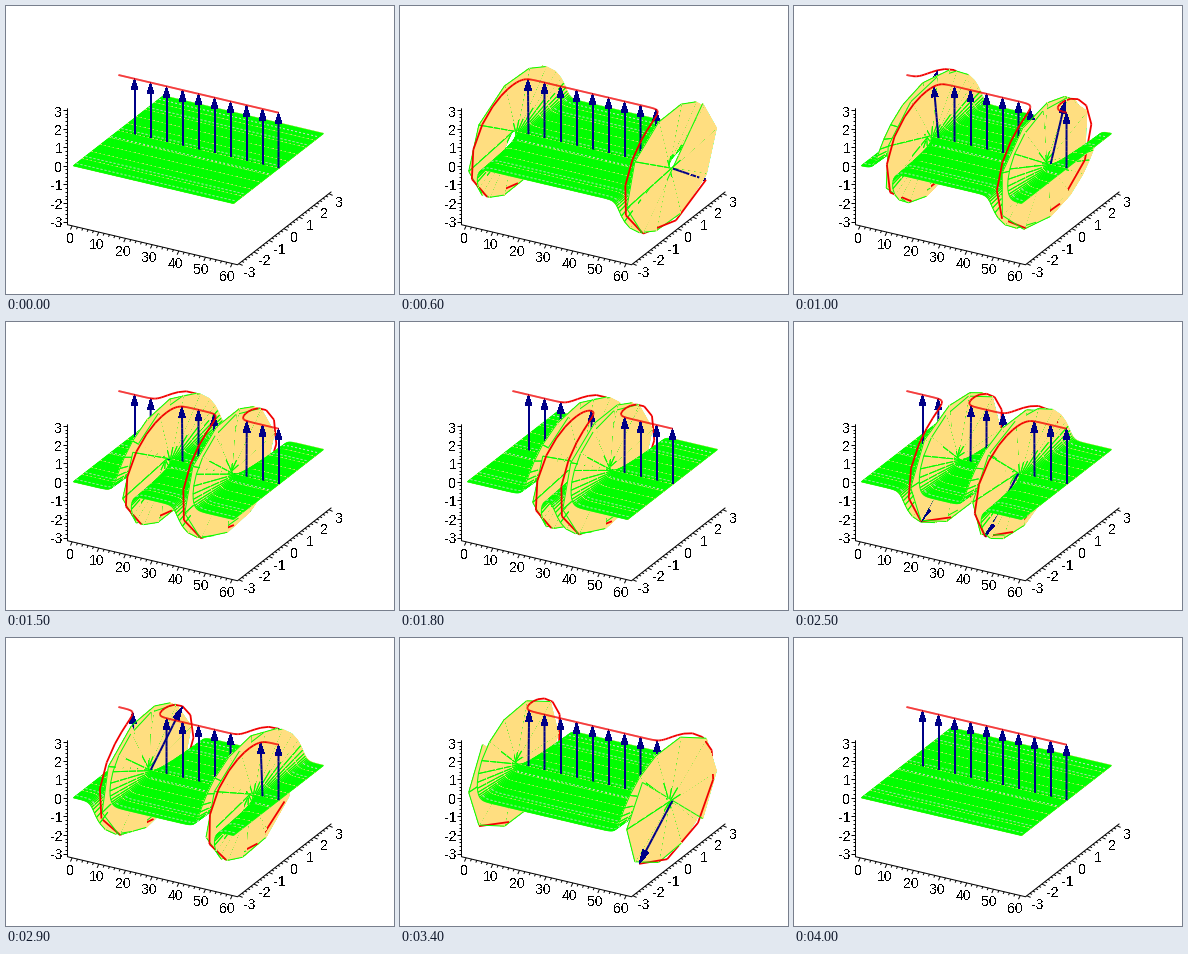
A matplotlib script that plays this animation: 388x288 px, repeating every 4100 ms.

```python
import numpy as np
import matplotlib.pyplot as plt
from matplotlib.animation import FuncAnimation
from matplotlib.collections import LineCollection, PolyCollection

W, H, DPI = 388, 288, 64
PX = 72 / DPI
FRAMES, INTERVAL = 41, 100

GREEN, WHEAT, GREY = (0, 1, 0, 1), (1, 0.87, 0.5, 1), (0.82, 0.84, 0.82, 1)
RED, NAVY, BLACK, CLEAR = (0.95, 0, 0, 1), (0, 0, 0.53, 1), (0, 0, 0, 1), (0, 0, 0, 0)

# Columns: screen x, screen y, nearness to the viewer
ORIGIN = np.array([112.5, 124.8, 0])
AXES = np.array([[2.667, 0.628, 1.33], [15, -11.67, -24.6], [0, -18.6, 8.8]])

SPEED = 0.2
GAMMA = 1 / np.sqrt(1 - SPEED**2)
CELLS, PIECES = 160, 10
XS = np.linspace(0, 60, CELLS + 1)
STRIPES = (-2.8, -2.5, -2.2, -0.5, -0.2, 0.2, 2.0, 2.4, 2.7)

plt.rcParams["text.antialiased"] = False
plt.rcParams["font.family"] = "Liberation Sans"


def project(x, y, z):
    xyz = np.stack(np.broadcast_arrays(x, y, z), axis=-1)
    return ORIGIN + xyz @ AXES


def twist(x, n):
    """Angle of a colliding sine-Gordon kink and antikink."""
    t = 10 * (n - 20)
    ratio = np.sinh(GAMMA * SPEED * t) / (SPEED * np.cosh(GAMMA * (x - 30)))
    return -4 * np.arctan(ratio)


def place(x, phi, across, up):
    y = across * np.cos(phi) + up * np.sin(phi)
    z = up * np.cos(phi) - across * np.sin(phi)
    return project(x, y, z)


class Scene:
    """Collects flat pieces and sorts them from far to near."""

    def __init__(self):
        self.polys, self.near, self.fill, self.edge, self.width = [], [], [], [], []

    def add(self, polys, fill, edge, width, lift):
        polys = polys.reshape(-1, 4, 3)
        n = len(polys)
        self.polys.append(polys[..., :2])
        self.near.append(polys[..., 2].mean(axis=1) + lift)
        self.fill.append(np.broadcast_to(fill, (n, 4)))
        self.edge.append(np.broadcast_to(edge, (n, 4)))
        self.width.append(np.full(n, width * PX))

    def lines(self, a, b, color, width, lift):
        self.add(np.stack([a, b, b, a], axis=-2), CLEAR, color, width, lift)

    def show(self, coll):
        parts = (self.polys, self.near, self.fill, self.edge, self.width)
        polys, near, fill, edge, width = map(np.concatenate, parts)
        order = np.argsort(near, kind="stable")
        coll.set_verts(polys[order])
        coll.set_facecolor(fill[order])
        coll.set_edgecolor(edge[order])
        coll.set_linewidth(width[order])
        # Smooth lines, but hard fills so that no seams show
        coll.set_antialiased(fill[order, 3] == 0)


def add_ribbon(scene, n):
    phi = twist(XS, n)
    low, high = place(XS, phi, -3, 0), place(XS, phi, 3, 0)

    # Rails alternate between cross lines and cell diagonals
    a = np.repeat(low, 2, axis=0)[:-1, None]
    b = np.repeat(high, 2, axis=0)[1:, None]
    b = np.concatenate([high[:1, None], b[:-1]])
    f = np.linspace(0, 1, PIECES + 1)[:, None]
    rails = a * (1 - f) + b * f
    quads = np.stack([rails[:-1, :-1], rails[1:, :-1], rails[1:, 1:], rails[:-1, 1:]],
                     axis=-2)
    scene.add(quads, WHEAT, CLEAR, 0, 0)
    scene.lines(rails[:, :-1], rails[:, 1:], GREEN, 1, 3)
    for side in (low, high):
        scene.lines(side[:-1], side[1:], GREEN, 1, 3)

    level = np.abs(np.sin(phi / 2)) < 0.05
    level = level[:-1] & level[1:]
    dashes = level & (np.arange(CELLS) % 4 < 2)
    for across in STRIPES:
        row = place(XS, phi, across, 0)
        scene.lines(row[:-1][dashes], row[1:][dashes], GREY, 1, 4)
    axis = place(XS, phi, 0, 0)
    scene.lines(axis[:-1][level], axis[1:][level], BLACK, 0.8, 5)


def add_arrow(scene, x, n):
    pts = place(x, twist(x, n), 0, np.linspace(0, 3, 11))
    scene.lines(pts[:8], pts[1:9], NAVY, 2, 7)
    tip, neck = pts[-1], pts[8]
    along = (tip - neck)[:2]
    size = max(np.hypot(*along), 1e-6)
    side = np.append([-along[1], along[0]], 0) / size * 3.5
    head = np.stack([neck - side, neck + side, tip, tip])
    scene.add(head, NAVY, CLEAR, 0, 8)


def draw(n):
    scene = Scene()
    add_ribbon(scene, n)
    for x in range(6, 61, 6):
        add_arrow(scene, x, n)
    tips = place(XS, twist(XS, n), 0, 3)
    scene.lines(tips[:-1], tips[1:], RED, 1.8, 9)
    scene.show(pieces)
    return (pieces,)


def draw_axes():
    x0, x1, y0, y1, z0, z1 = -1.75, 62, -3.09, 3.17, -3.17, 3.09
    corners = project([x0, x0, x1, x1], [y0, y0, y0, y1], [z1, z0, z0, z0])[:, :2]
    marks = []

    def ticks(points, major, step):
        for i, p in enumerate(points[:, :2]):
            size = 1.7 if i % major == 0 else 1
            marks.append([p, p + np.array(step) * size])

    small = np.linspace(-3, 3, 31)
    ticks(project(x0, y0, small), 5, (-2.5, 0))
    ticks(project(np.arange(0, 61, 2), y0, z0), 5, (-1, 2.2))
    ticks(project(x1, small, z0), 5, (2.2, 1))
    ax.add_collection(LineCollection([corners] + marks, colors="black", linewidths=PX))

    def label(x, y, value, ha="center"):
        ax.text(x, y, str(value), fontsize=14 * PX, ha=ha, va="center_baseline")

    for i in range(7):
        v = i - 3
        label(56.5, 160.3 - 18.4 * v, v, "right")
        label(64.5 + 26.1 * i, 231.5 + 6.3 * i, 10 * i)
        label(244 + 14.9 * i, 265.5 - 11.7 * i, v)


fig = plt.figure(figsize=(W / DPI, H / DPI), dpi=DPI, facecolor="white")
ax = fig.add_axes([0, 0, 1, 1])
ax.set_xlim(0, W)
ax.set_ylim(H, 0)
ax.axis("off")
draw_axes()
pieces = PolyCollection([], joinstyle="bevel")
ax.add_collection(pieces, autolim=False)

anim = FuncAnimation(fig, draw, frames=FRAMES, interval=INTERVAL,
                     repeat=True, repeat_delay=0)
plt.show()
```
